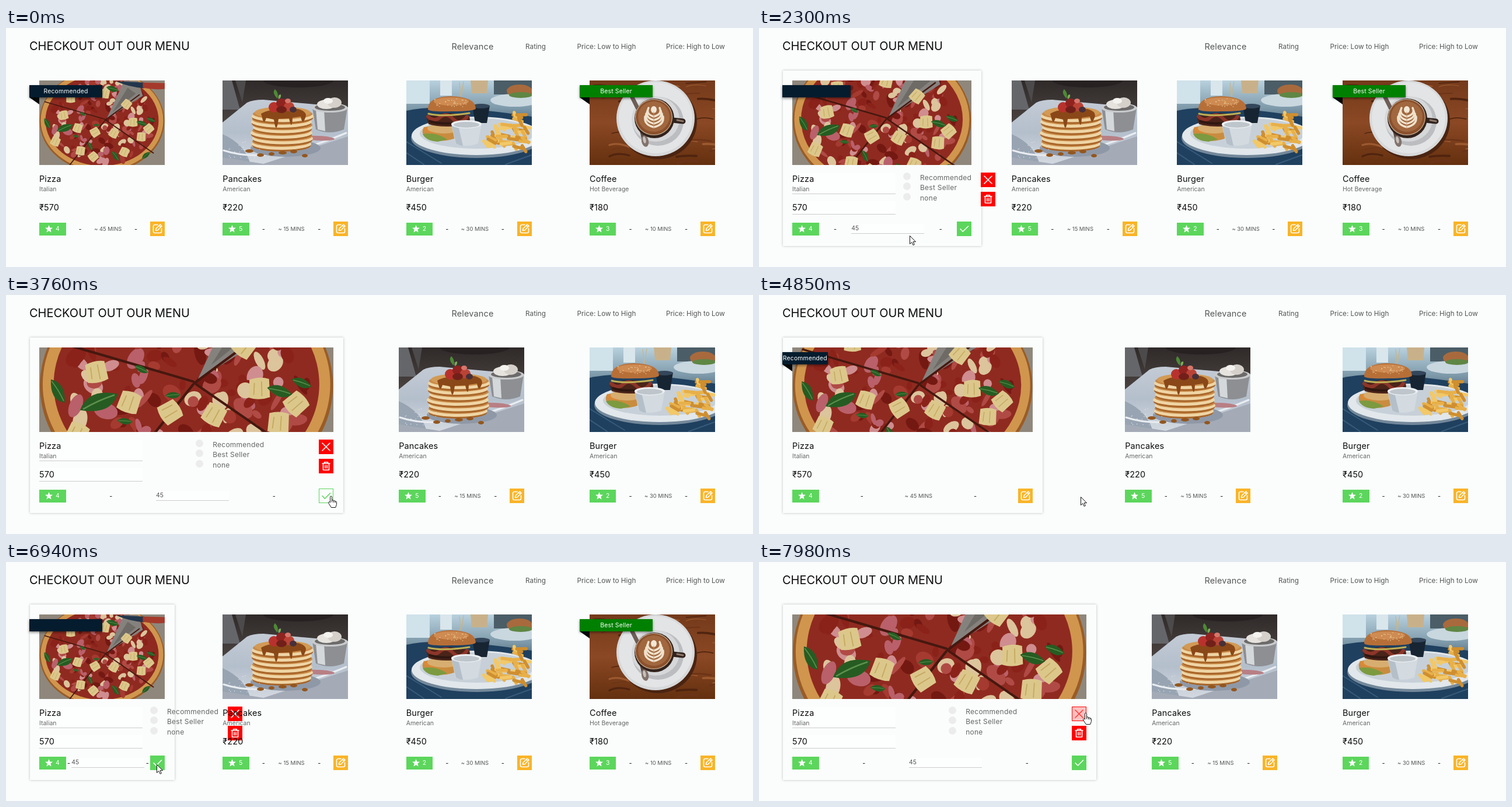
These frames come from a looping animation (1280x410 px, 8000 ms). An HTML page:

```html
<!DOCTYPE html>
<html lang="en">
<head>
<meta charset="utf-8">
<title>Menu</title>
<style>
  html, body { margin: 0; width: 100%; height: 100%; overflow: hidden; background: #fafdfc; }
  body { position: relative; font-family: Inter, "Noto Sans", sans-serif; color: #0c0c0c; }
  p, h1 { margin: 0; font-weight: 400; }
  .t { position: absolute; line-height: 20px; white-space: nowrap; }
  h1.t { left: 40px; top: 21px; font-size: 20px; }
  nav .t { top: 21.5px; width: 160px; text-align: center; font-size: 11.7px; color: #555; }
  nav .t.on { font-size: 14.4px; letter-spacing: .2px; }

  .menu { position: absolute; left: 40.5px; top: 73px; width: 1191px; display: flex; flex-wrap: wrap;
    justify-content: space-between; gap: 70px 4px; }
  .card { position: relative; width: 248px; height: 301px; --lift: 0;
    box-shadow: 0 0 4px rgba(0, 0, 0, calc(var(--lift) * .26)); }
  .photo { position: absolute; left: 16.5px; top: 17px; width: calc(100% - 33px); height: 145px; display: block; }
  .name, .kind, .price { left: 16.5px; }
  .name, .price { font-size: 14.4px; letter-spacing: .15px; }
  .name { top: 176px; }
  .kind { top: 194px; font-size: 10.5px; color: #666; }
  .price { top: 225px; }

  .ribbon { position: absolute; left: -.5px; top: 25px; width: 125px; height: 21px; line-height: 21px;
    font-size: 10.4px; letter-spacing: .2px; text-align: center; white-space: nowrap; color: #fff;
    background: var(--c); box-shadow: 0 2px 4px rgba(0, 0, 0, .45); }
  .ribbon::after { content: ""; position: absolute; left: 0; top: 100%; width: 17px; height: 12px;
    background: #050808; clip-path: polygon(0 0, 100% 0, 100% 100%); }
  .edit .ribbon::after { display: none; }

  .row, .tools { position: absolute; left: 16.5px; right: 16.5px; display: flex; justify-content: space-between; }
  .row { top: 259px; height: 25px; align-items: center; font-size: 9.4px; color: #555; }
  .row > *, .tools > * { flex: none; }
  .badge { width: 45.5px; height: 22px; line-height: 22px; background: #5cd65c; color: #fff; font-size: 10.4px; display: flex; }
  .badge svg { width: 13px; height: 13px; margin: 4px 5px 0 10px; fill: #fff; }
  .dash { width: 5px; text-align: center; color: #111; font-size: 11px; }
  .mins { width: 46.5px; display: flex; justify-content: center; white-space: nowrap; }
  .field { width: 125px; height: 16px; line-height: 16px; border-bottom: 1px solid #ccc; background: #fdfefe; font-size: 10.4px; }
  .btn { --h: 0; box-sizing: border-box; width: 25px; height: 25px; border: 1px solid var(--c);
    background: color-mix(in srgb, transparent calc(var(--h) * 100%), var(--c));
    color: color-mix(in srgb, var(--c) calc(var(--h) * 100%), #fff); }
  .btn svg { display: block; width: 23px; height: 23px; fill: none; stroke: currentColor; stroke-width: 1.6;
    stroke-linejoin: round; stroke-linecap: round; }

  .tools { top: 175px; }
  .inputs { width: 177px; }
  .inputs i { display: block; height: 36px; border-bottom: 1px solid #ccc; background: #fdfefe; }
  .inputs i + i { height: 23px; margin-top: 11px; }
  .picks { width: 146px; position: relative; font-size: 12px; letter-spacing: .25px; color: #666; }
  .picks p { position: absolute; left: 42px; line-height: 18px; }
  .picks p::before { content: ""; position: absolute; left: -29px; top: 0; width: 13px; height: 13px;
    border-radius: 50%; background: #ececec; }
  .cut .btn + .btn { margin-top: 8px; }
  .editing, .edit .view { display: none !important; }
  .edit .editing { display: flex !important; }
  .edit .field.editing, .edit .btn.editing { display: block !important; }

  #cursor { position: absolute; left: 0; top: 0; width: 22px; height: 24px; overflow: visible;
    fill: #fff; stroke: #111; stroke-width: 1; stroke-linejoin: round; }
</style>
</head>
<body>
<h1 class="t">CHECKOUT OUT OUR MENU</h1>
<nav>
  <p class="t on" style="left:719.5px">Relevance</p>
  <p class="t" style="left:827.5px">Rating</p>
  <p class="t" style="left:949px">Price: Low to High</p>
  <p class="t" style="left:1101.5px">Price: High to Low</p>
</nav>
<main class="menu"></main>
<svg id="cursor">
  <path id="arrow" d="M.5.5v14l3.3-3 2.3 5 2.2-1-2.2-4.8h4.4z"/>
  <path id="hand" d="M-1.5 11V1.6a1.5 1.5 0 0 1 3 0V7q2.6-1 2.9 1 2.300-.8 2.700.9 2-.4 2.300 1.300v4.300l-1.700 5H.3l-4.300-7q-1.300-2.300.4-2.600 1.300 0 2.100 1.100zM1.500 7v3.500M4.400 8v3M7.100 9v2.500"/>
</svg>
<script>
const clamp = x => Math.min(1, Math.max(0, x));
let seed = 7;
const rnd = () => (seed = seed * 16807 % 2147483647) / 2147483647;

// ---- photos -------------------------------------------------------------
const oval = (x, y, rx, ry, fill, turn = 0) =>
  `<ellipse rx="${rx}" ry="${ry}" fill="${fill}" transform="translate(${x} ${y}) rotate(${turn})"/>`;
const shape = (d, fill) => `<path d="${d}" fill="${fill}"/>`;
const line = (d, color, w) => `<path d="${d}" fill="none" stroke="${color}" stroke-width="${w}" stroke-linecap="round"/>`;
const fade = (id, ...colors) => `<linearGradient id="${id}" x2="0" y2="1">` +
  colors.map((c, i) => `<stop offset="${i / (colors.length - 1)}" stop-color="${c}"/>`).join('') + '</linearGradient>';
const back = fill => `<rect width="215" height="145" fill="${fill}"/>`;
const many = (n, f) => Array.from({ length: n }, (_, i) => f(i)).join('');

function pizza() {
  const tones = ['#8a2219', '#a53a30', '#b9606a', '#cf8d8f', '#dcc49c', '#741812', '#b04a45'];
  const fruit = [[-66, -13, 0], [-42, 9, 30], [53, -1, 10], [80, 10, 60], [20, 18, 40], [67, 24, 15], [-37, 48, 20],
    [-12, 16, 70], [38, 50, 35], [-54, -42, 10], [42, -32, 50], [5, -50, 25], [-15, 58, 60], [-80, 32, 35]];
  const leaves = [[-64, 9, 1.35, -18], [-94, 1, .9, 65], [68, 1, .85, 20], [84, -5, .7, 25], [-10, 4, .5, 0],
    [18, -58, 1, 20], [23, 57, .9, 60], [-45, 23, .5, 10], [75, 56, .8, -40], [-33, -15, .5, 30], [-20, 40, .7, 70]];
  return back('#8f877c') + '<g transform="translate(107.500 72.500)">' +
    oval(0, -3, 107, 88, '#9a5c26') + oval(0, -4, 105, 86, '#d0964e') + oval(0, -4, 97, 78, '#8f2a20') +
    many(190, () => {
      const a = rnd() * 6.283, r = Math.sqrt(rnd()) * .97;
      return oval(94 * r * Math.cos(a), 76 * r * Math.sin(a) - 4, 3 + rnd() * 6, 2 + rnd() * 4, tones[rnd() * 7 | 0], rnd() * 180);
    }) +
    shape('M8-7L38-72 62-72 70-46z', '#85827e') + shape('M18-18L44-60 58-50z', '#6e6a66') +
    line('M5-6L-98-36M5-4L-55 72M7-4L88 52M6-5L64-48', '#45180f', 1.8) +
    fruit.map(([x, y, r]) => `<g transform="translate(${x} ${y}) rotate(${r})">` +
      shape('M-8-5Q-1-9 6-8L9 5Q2 9-6 8z', '#dcc78b') + line('M-4-3L-3 5M1-5L3 5', '#c5a961', .8) + '</g>').join('') +
    leaves.map(([x, y, s, r]) => `<g transform="translate(${x} ${y}) rotate(${r}) scale(${s})">` +
      shape('M-11 1Q-3-9 11-1Q4 9-11 1', '#265c22') + line('M-9 1Q0-1 9-1', '#5d914d', .8) + '</g>').join('') +
    shape('M24-71L72-69 72-59Q44-62 24-71', '#22364c') + shape('M70-69L108-68V-58Q90-56 70-60z', '#a53a2b') + '</g>';
}

function pancakes() {
  return fade('pb', '#2f2a29', '#4a4341', '#6d6967') + back('url(#pb)') +
    shape('M0 0H16L30 50H0z', '#65666a') + shape('M22 0H40L34 38z', '#4d4a4b') + oval(130, 0, 60, 12, '#272122') +
    fade('pp', '#c3cbd5', '#b4bfcc', '#d5dae1') +
    shape('M0 72L42 38Q52 33 70 33L215 46V118L160 145H0z', 'url(#pp)') +
    shape('M0 92Q40 110 48 145H0z', '#98a4b2') + shape('M0 132L70 143 215 96V145H0z', '#a4abb7') +
    line('M2 120Q80 146 212 90', '#e9edf1', 3) +
    oval(108, 116, 60, 15, '#8f98a6') + oval(165, 99, 27, 4, '#b87f84', 3) +
    shape('M154 47H214L208 84Q184 94 160 84z', '#8d8f93') + shape('M160 50H174L176 87 163 84z', '#d5d8da') +
    oval(184, 47, 31, 8, '#c8cacc') + oval(184, 46, 26, 6, '#6c6a6a') +
    oval(178, 41, 16, 8, '#e6e3de') + oval(192, 38, 12, 9, '#d5d0ca') + oval(181, 35, 8, 5, '#f5f3f0') +
    many(6, i => {
      const y = 109 - i * 9.5, x = 102 + (i % 2) * 2 - 1;
      return oval(x, y + 3, 50 + i % 3, 10, '#a8662a') + oval(x, y, 51 + i % 3, 10, '#efd5a5') +
        oval(x, y - 4, 50 + i % 2, 9, '#c98a47');
    }) +
    oval(103, 55, 48, 10, '#d29a55') +
    shape('M66 57Q80 47 130 49Q148 54 141 66 137 77 134 62L120 64Q119 88 114 65L96 66Q92 96 88 67L75 64Q71 78 68 64z', '#8a4818') +
    oval(88, 46, 9, 9, '#b8322d') + oval(101, 39, 9, 8, '#8f231f') + oval(114, 45, 9, 8, '#ba4336') +
    oval(101, 50, 9, 6, '#712019') + oval(121, 50, 6, 5, '#473039') + oval(112, 35, 5, 4, '#d7766a') +
    shape('M94 31Q84 21 90 15Q97 22 94 31', '#4d8a35') + shape('M96 32Q94 24 100 24 101 30 96 32', '#7fa95b') +
    many(6, i => oval(46 + i * 19, 121 + (i * 7) % 9, 7 - i % 3, 3, '#93571f')) +
    many(22, () => oval(5 + rnd() * 60, 105 + rnd() * 30, .7, .6, '#eef1f4'));
}

function burger() {
  return fade('bb', '#b9d1de', '#7d99a9', '#2c4358', '#20384f') + back('url(#bb)') +
    shape('M0 0H40V40H0z', '#d0e2ea') + shape('M58 0H78V26H58z', '#d9e6eb') + shape('M110 0H140L138 22H112z', '#c8b18a') +
    shape('M150 0H215V24H150z', '#4b5d66') + oval(186, 34, 42, 11, '#c9d7df') + oval(194, 18, 22, 11, '#a86a3d') + oval(196, 25, 20, 5, '#5f8644') +
    shape('M0 52Q60 38 215 62V145H0z', '#1f405f') + line('M0 105L60 142M0 124L30 144M170 144L214 128', '#385b7b', 2) +
    oval(120, 99, 112, 34, '#73889a') + oval(120, 95, 111, 33, '#e1e7eb') + oval(121, 91, 98, 26, '#c7d0d8') +
    shape('M113 43H143L138 73H118z', '#172432') + oval(128, 44, 15, 4, '#33465a') +
    shape('M30 80Q22 94 42 102 66 107 86 98L92 74z', '#c98c3f') + shape('M28 92Q50 88 70 101L54 105Q34 104 28 92', '#7c9a3f') +
    oval(48, 84, 18, 6, '#dc8936') + oval(64, 82, 28, 9, '#d7ae70') +
    shape('M34 63Q70 50 108 62 112 75 98 77 60 82 38 75z', '#4a2419') +
    line('M37 62Q48 72 58 63T80 66 104 62', '#8d3529', 6) + line('M40 70Q62 77 98 71', '#2f1711', 4) +
    line('M38 57Q60 63 108 56', '#bfae54', 3) +
    shape('M37 50Q36 28 76 27 118 28 119 48 118 53 76 53 42 54 37 50', '#b76f38') + oval(77, 36, 30, 7, '#ce8b52') +
    many(34, () => oval(48 + rnd() * 60, 31 + rnd() * 14, .9, .6, '#f0d6a3')) +
    line('M91 3L93 27M98 2L94 27', '#c9b486', 1.2) +
    many(46, i => {
      const x = 132 + rnd() * 72, y = 113 - rnd() * 58 * clamp(1.25 - Math.abs(x - 178) / 42), a = rnd() * 1.6 - .2;
      return line(`M${x} ${y}l${16 * Math.cos(a)} ${11 * Math.sin(a)}`, ['#e8b04a', '#f2c868', '#cf8f30'][i % 3], 5.5);
    }) +
    shape('M77 74H129L123 108Q103 116 84 108z', '#d3dae0') + oval(103, 75, 26, 7, '#edf0f2') + oval(103, 76, 22, 5, '#bec6cc') +
    shape('M78 78L85 108Q92 112 97 112L90 82z', '#b4bfc9');
}

function coffee() {
  return fade('cb', '#743a1b', '#8b4824', '#64300f') + back('url(#cb)') +
    many(34, i => {
      const x = rnd() * 215, y = rnd() * 145;
      return line(`M${x} ${y}q14-${rnd() * 9} 34 ${rnd() * 8 - 4}`, ['#50240f', '#9c592f', '#6a3217'][i % 3], 1 + rnd() * 3);
    }) +
    oval(117, 70, 67, 65, '#4a2411') + oval(113, 65, 67, 65, '#d6d8da') + oval(113, 64, 63, 61, '#e3e4e5') +
    oval(117, 70, 44, 42, '#bbbdc0') + oval(113, 66, 41, 39, '#d5d7d9') +
    line('M72 27L82 47', '#6d5e57', 7) + line('M88 82L94 107', '#5b4a43', 6) + oval(95, 104, 6, 10, '#81736c', -12) + oval(94, 102, 2.500, 6, '#c9c1bb', -12) +
    line('M142 68L160 70', '#30221d', 9) + line('M150 68L160 70', '#8b7769', 3) +
    oval(111, 65, 34, 34, '#33231c') + oval(110, 63, 32, 31, '#d9c3a7') + oval(110, 63, 31, 30, '#8b512d') +
    oval(110, 62, 27, 26, '#a1673e') +
    many(4, i => line(`M110 ${80 - i * 6}Q${93 + i} ${76 - i * 6} ${95 + i * 2} ${62 - i * 5}M110 ${80 - i * 6}Q${128 - i} ${76 - i * 6} ${126 - i * 2} ${62 - i * 5}`, '#f0e2cd', 3.4)) +
    oval(110, 50, 5, 6, '#f3e8d7') + line('M110 82V54', '#c39a70', 1);
}

// ---- markup -------------------------------------------------------------
const icons = {
  pen: 'M12 4.500H7a2.500 2.500 0 0 0-2.500 2.500v9a2.500 2.500 0 0 0 2.500 2.500h9a2.500 2.500 0 0 0 2.500-2.500V11M8.500 14.500l.5-3.300 7.300-7.200 2.700 2.700-7.200 7.300zM14.500 6l2.500 2.500',
  tick: 'M5 11.800l4.300 4.400L18.500 7',
  cross: 'M5 5L18 18M18 5L5 18',
  bin: 'M5 7h13M8.500 7V4.800h6V7M6.500 7v11.200h10V7M10 10.300v4.700M13 10.300v4.700'
};
const btn = (icon, color, cls = '') =>
  `<div class="btn ${icon} ${cls}" style="--c:${color}"><svg viewBox="0 0 23 23"><path d="${icons[icon]}"/></svg></div>`;
const star = '<svg viewBox="0 0 24 24"><path d="M12 0l3.300 8.500 8.700.4-6.800 5.600 2.400 8.900-7.600-5-7.600 5 2.400-8.900L0 8.900l8.700-.4z"/></svg>';

const tools = `<div class="tools editing"><div class="inputs"><i></i><i></i></div><div class="picks">` +
  ['Recommended', 'Best Seller', 'none'].map((s, i) => `<p style="top:${i * 17.5 - .5}px">${s}</p>`).join('') +
  `</div><div class="cut">${btn('cross', '#f00')}${btn('bin', '#f00')}</div></div>`;

const card = d => `<article class="card"><svg class="photo" viewBox="0 0 215 145" preserveAspectRatio="xMidYMid slice">${d.photo()}</svg>` +
  (d.tag ? `<div class="ribbon" style="--c:${d.color}"><span class="view">${d.tag}</span></div>` : '') +
  (d.tools || '') +
  `<p class="t name">${d.name}</p><p class="t kind">${d.kind}</p><p class="t price"><span class="view">₹</span>${d.price}</p>
  <div class="row"><div class="badge">${star}${d.rating}</div><div class="dash">-</div>
  <div class="mins view">~ ${d.mins} MINS</div>${d.tools ? `<div class="field editing">${d.mins}</div>` : ''}<div class="dash">-</div>
  ${btn('pen', '#f9b428', 'view')}${d.tools ? btn('tick', '#5cd65c', 'editing') : ''}</div></article>`;

const $ = s => document.querySelector(s);
$('.menu').innerHTML = [
  { name: 'Pizza', kind: 'Italian', price: 570, rating: 4, mins: 45, photo: pizza, tag: 'Recommended', color: '#041c2e', tools },
  { name: 'Pancakes', kind: 'American', price: 220, rating: 5, mins: 15, photo: pancakes },
  { name: 'Burger', kind: 'American', price: 450, rating: 2, mins: 30, photo: burger },
  { name: 'Coffee', kind: 'Hot Beverage', price: 180, rating: 3, mins: 10, photo: coffee, tag: 'Best Seller', color: '#008000' }
].map(card).join('');

// ---- motion -------------------------------------------------------------
const LOOP = 8000, END = 9000;

// bursts of stepped motion: start, end, steps
const bursts = [[880, 1500, 9], [2170, 2300, 1], [2300, 2510, 3], [3130, 3760, 9], [4300, 4510, 3], [4710, 5060, 5],
  [5320, 5870, 8], [6070, 6140, 1], [6870, 7630, 11], [7700, 7770, 1], [7910, 7980, 1]];
function snap(t) {
  const b = bursts.find(([a, z]) => t >= a && t < z);
  if (!b) return t;
  const step = (b[1] - b[0]) / b[2];
  return b[0] + Math.floor((t - b[0]) / step + .1) * step;
}

// pointer path: time, x, y
const path = [[739, 308, 430], [740, 308, 409], [879, 308, 409], [880, 311, 403], [1020, 316, 391], [1220, 303, 370],
  [1400, 267, 357], [1500, 258, 356], [3129, 258, 356], [3130, 266, 354], [3340, 380, 337], [3480, 450, 333],
  [3620, 522, 339], [3760, 557, 345], [4299, 557, 345], [4300, 556, 345], [4510, 551, 346], [5319, 551, 345],
  [5320, 540, 344], [5595, 313, 332], [5700, 278, 334], [5870, 265, 338], [6069, 265, 338], [6070, 262, 342],
  [6140, 258, 347], [7080, 258, 347], [7400, 480, 290], [7630, 577, 249], [7699, 577, 249], [7700, 569, 252],
  [7770, 561, 255], [7909, 561, 255], [7910, 560, 257], [7980, 560, 259]];
function pointer(t) {
  const i = path.findIndex(p => p[0] > t);
  if (i < 1) return path[i ? path.length - 1 : 0].slice(1);
  const [a, x, y] = path[i - 1], [b, u, v] = path[i], k = (t - a) / (b - a);
  return [x + (u - x) * k, y + (v - y) * k];
}

// the CSS "ease" curve
function ease(x) {
  let lo = 0, hi = 1, s = .5;
  for (let i = 0; i < 20; i++) {
    s = (lo + hi) / 2;
    const r = 1 - s;
    if (.75 * r * r * s + .75 * r * s * s + s ** 3 < x) lo = s; else hi = s;
  }
  return .3 * (1 - s) ** 2 * s + 3 * (1 - s) * s * s + s ** 3;
}
const level = (t, spans, d, f = x => x) =>
  spans.reduce((v, [a, b]) => v + f(clamp((t - a) / d)) - f(clamp((t - b) / d)), 0);
const within = (t, spans) => spans.some(([a, b]) => t >= a && t < b);

const [first, second] = document.querySelectorAll('.card');
const ribbon = first.querySelector('.ribbon');
const hover = (name, h) => first.querySelector('.' + name).style.setProperty('--h', h);

function draw(time) {
  const t = snap(time);
  first.classList.toggle('edit', within(t, [[2165, 4705], [6935, END]]));
  first.style.width = 248 + 289.5 * level(t, [[2237, 4787], [7005, END]], 300, ease) + 'px';
  const tag = 125 * (1 - level(t, [[2277, 4742], [7045, END]], 300, ease));
  ribbon.style.width = tag + 'px';
  ribbon.style.display = tag < 1 ? 'none' : '';

  first.style.setProperty('--lift', level(t, [[1290, 4860], [5640, END]], 150));
  second.style.setProperty('--lift', level(t, [[4900, 5520]], 150));
  hover('pen', level(t, [[1400, 2170], [5780, 6935]], 100));
  hover('tick', level(t, [[3650, 4710]], 100));
  hover('cross', level(t, [[7905, END]], 100));

  const hand = within(t, [[1400, 2165], [3650, 4705], [5780, 6935], [7905, END]]);
  $('#hand').style.display = hand ? '' : 'none';
  $('#arrow').style.display = hand ? 'none' : '';
  const [x, y] = pointer(t);
  $('#cursor').style.transform = `translate(${Math.round(x)}px, ${Math.round(y)}px)`;
}

const start = performance.now();
function tick() {
  draw((performance.now() - start) % LOOP);
  requestAnimationFrame(tick);
}
tick();
</script>
</body>
</html>
```
